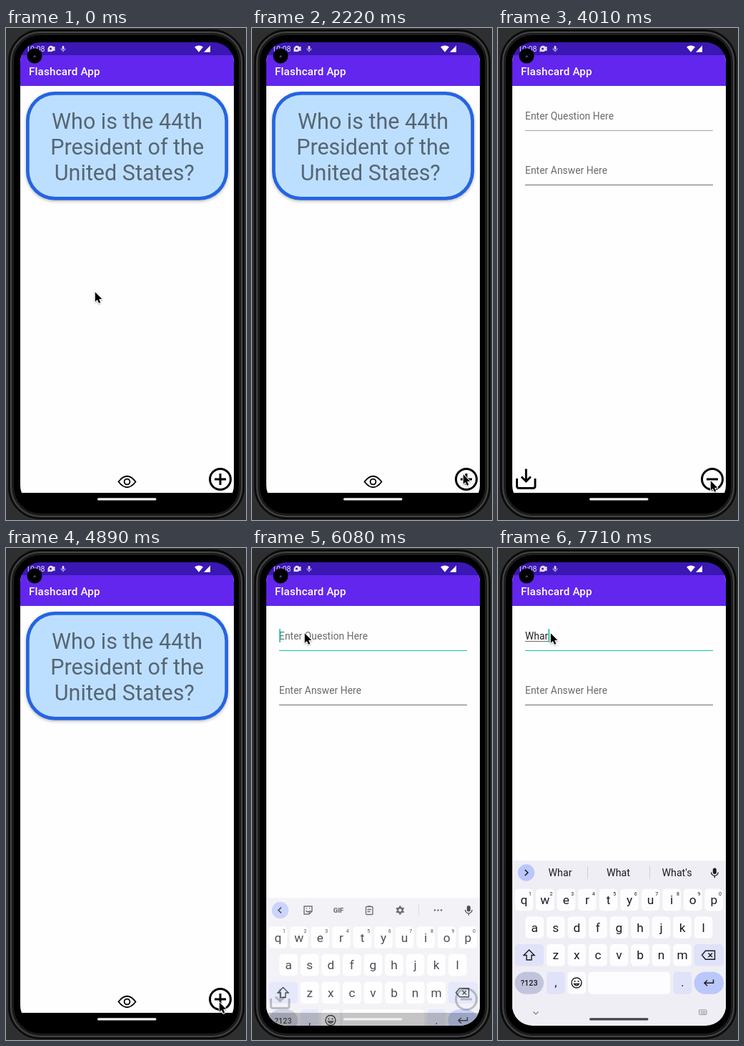
An HTML page with a canvas that plays this animation: 336 by 688 pixels, repeating every 8000 ms.

```html
<!DOCTYPE html>
<html lang="en">
<head>
<meta charset="utf-8">
<title>Flashcard App</title>
<style>
html, body { margin: 0; width: 100%; height: 100%; overflow: hidden; background: #2e2f31; }
canvas { display: block; width: 336px; height: 688px; }
</style>
</head>
<body>
<canvas id="stage"></canvas>
<script>
const W = 336, H = 688, LOOP = 8000, STEP = LOOP / 54;
const canvas = document.getElementById('stage');
const ctx = canvas.getContext('2d');
const dpr = window.devicePixelRatio || 1;
canvas.width = W * dpr;
canvas.height = H * dpr;

const INK = '#1b1b20', KEY = '#fdfdff', TINT = '#dfe2f9', ACCENT = '#bac7fb', TEAL = '#12bfa9';
const clamp = v => Math.max(0, Math.min(1, v));

// Helpers
function box(x, y, w, h, r, fill, stroke, lw = 1) {
  ctx.beginPath();
  ctx.roundRect(x, y, w, h, r);
  if (fill) { ctx.fillStyle = fill; ctx.fill(); }
  if (stroke) { ctx.strokeStyle = stroke; ctx.lineWidth = lw; ctx.stroke(); }
}
const disc = (x, y, r, fill, stroke, lw) => box(x - r, y - r, 2 * r, 2 * r, r, fill, stroke, lw);
function line(d, color, lw) {
  ctx.strokeStyle = color;
  ctx.lineWidth = lw;
  ctx.stroke(new Path2D(d));
}
function shape(d, color) {
  ctx.fillStyle = color;
  ctx.fill(new Path2D(d));
}
function text(s, x, y, size, color, { align = 'left', weight = 400, spacing = 0 } = {}) {
  ctx.font = `${weight} ${size}px Roboto, sans-serif`;
  ctx.letterSpacing = spacing + 'px';
  ctx.textAlign = align;
  ctx.fillStyle = color;
  ctx.fillText(s, x, y);
}
const label = (s, x, y, size, weight = 400) => text(s, x, y, size, INK, { align: 'center', weight });
function at(x, y, draw) {
  ctx.save();
  ctx.translate(x, y);
  draw();
  ctx.restore();
}

// Pointer waypoints: step, x, y
const POINTER = [
  [0, 124, 368], [1, 107, 343], [2, 88, 302], [3, 106, 269], [4, 139, 286], [5, 161, 326], [6, 167, 351],
  [10, 167, 351], [11, 182, 383], [13, 256, 540], [14, 287, 606], [15, 295, 623],
  [23, 295, 623], [27, 297, 632], [31, 297, 632], [33, 298, 634],
  [36, 298, 634], [37, 256, 530], [38, 160, 300], [39, 92, 150], [40, 73, 118], [54, 73, 118]
];
function pointerAt(step) {
  const n = Math.max(1, POINTER.findIndex(p => p[0] >= step));
  const [a, ax, ay] = POINTER[n - 1], [b, bx, by] = POINTER[n];
  const k = (step - a) / (b - a);
  return [ax + (bx - ax) * k, ay + (by - ay) * k];
}

const TYPED_AT = [46, 48, 49, 51];
const typedAt = step => 'Whar'.slice(0, TYPED_AT.filter(s => s <= step).length);
const SUGGESTIONS = { W: ['What', 'We'], Wh: ['What', 'When'], Wha: ['What', "What's"], Whar: ['What', "What's"] };

// Phone
function phone() {
  ctx.fillStyle = '#2e2f31';
  ctx.fillRect(0, 0, W, H);
  box(4, 3, 329, 683, 44, '#151515', '#0a0a0a', 2);
  box(7, 6, 323, 677, 41, null, '#444445', 2.2);
  box(10, 9, 317, 671, 38, '#000', '#1c1c1d', 2);
}
function statusBar() {
  const c = '#e4dcfa', bar = '#3b17b4';
  ctx.fillStyle = bar;
  ctx.fillRect(20, 20, 299, 18);
  text('10:08', 28, 33, 10.6, c);
  disc(63, 29, 4.3, c);
  shape('M58.5 33.5v-5l4 4zM66.5 26h2v6h-2z', c);
  disc(62.5, 29, 1.5, bar);
  box(78.7, 25, 2.6, 5, 1.3, c);
  line('M77 28.500a3 3 0 0 0 6 0M80 31.500v2', c, .9);
  shape('M270 33.8l-6-7.2q6-4.4 12 0zM277 33.8h9v-9.2z', '#fff');
}
function camera() {
  disc(40, 39, 10.5, '#000');
  disc(40, 40, 1.8, '#343338');
  disc(40.5, 39.5, .7, '#777');
}

// Pages
function pageBase() {
  ctx.fillStyle = '#fefefe';
  ctx.fillRect(-20, 38, 380, 612);
  ctx.fillStyle = '#6226ee';
  ctx.fillRect(-20, 38, 380, 43);
  text('Flashcard App', 32, 66, 15.2, '#fff', { weight: 500, spacing: .19 });
}
function roundButton(plus) {
  disc(300, 631, 14.5, null, '#000', 3);
  line('M292 631h16' + (plus ? 'M300 623v16' : ''), '#000', 3);
}
function saveButton() {
  line('M26.5 630v10.500q0 3 3 3h19.500q3 0 3-3v-10.500M39.300 616.500v17M32.800 627.500l6.500 6.500 6.500-6.500', '#000', 2.9);
}
function cardPage() {
  pageBase();
  ctx.save();
  ctx.shadowColor = 'rgba(0,0,0,.28)';
  ctx.shadowBlur = 4 * dpr;
  ctx.shadowOffsetY = 1.5 * dpr;
  box(28, 89, 283, 151.7, 40.3, '#2564e2');
  ctx.restore();
  box(32.7, 93.7, 273.6, 142.3, 35.7, '#bddfff');
  ['Who is the 44th', 'President of the', 'United States? '].forEach((s, i) =>
    text(s, 169.6, 141 + i * 36, 30.5, '#566674', { align: 'center' }));
  line('M157.500 634.500q12-15.500 24 0q-12 15.500-24 0z', '#000', 1.8);
  disc(169.5, 634.5, 3.9, null, '#000', 1.8);
}
function formPage(typed, focused, caret) {
  pageBase();
  const field = { spacing: .07 }, hint = '#696969';
  text(typed || 'Enter Question Here', 38, 128, 13.8, typed ? '#222' : hint, field);
  const end = typed ? 38 + ctx.measureText(typed).width : 38;
  if (typed) line(`M38 130.500H${end}`, '#444', .8);
  if (caret) box(end + .2, 113, 1.6, 19, 0, TEAL);
  text('Enter Answer Here', 38, 204, 13.8, hint, field);
  line('M38 143.500H301', focused ? TEAL : '#a4a4a4', 1);
  line('M38 219.500H301', '#6c6c6c', 1);
  saveButton();
}

// The incoming page fades in while both pages slide sideways.
function pages(t, ...formState) {
  const card = () => { cardPage(); roundButton(true); };
  const form = () => { formPage(...formState); roundButton(false); };
  const slide = e => 30 * Math.exp(-e / 75);
  const open = t >= 5085 ? t - 5085 : t - 2863, close = t - 4178;
  if (open < 0) return card();
  if (close >= 0 && t < 5085) {
    at(-slide(close), 0, card);
    const alpha = clamp((118 - close) / 83);
    if (alpha) {
      ctx.globalAlpha = alpha;
      at(30 - slide(close), 0, form);
      ctx.globalAlpha = 1;
    }
    return;
  }
  const alpha = clamp((open - 50) / 83);
  if (alpha < 1) at(slide(open) - 30, 0, card);
  ctx.globalAlpha = alpha;
  at(open < 350 ? slide(open) : 0, 0, form);
  ctx.globalAlpha = 1;
}
function navBar() {
  ctx.fillStyle = '#000';
  ctx.fillRect(20, 650, 299, 18);
}

// Keyboard
function toolRow(word) {
  const y = 454;
  disc(39.5, y, 11.7, ACCENT);
  line(word ? 'M37.800 450l4 4-4 4' : 'M41 450l-4 4 4 4', INK, 1.6);
  box(300.8, 447.5, 5, 8.5, 2.5, INK);
  line('M298.500 453.500a4.800 4.800 0 0 0 9.600 0M303.300 458.300v3', INK, 1.3);
  if (word) {
    [word, ...SUGGESTIONS[word]].forEach((s, i) => label(s, [87, 168.5, 250.5][i], 459.3, 14.2));
    line('M125.500 445v18M212.500 445v18', '#cfced6', 1);
    return;
  }
  const c = '#45464f';
  line('M73 448.500h11v7l-4 4h-7zM80 459.500v-4h4M75.500 454.500q2 3 4 1M76 451.500h1M80 451.500h1', c, 1.4);
  text('GIF', 121, 457.5, 9.5, c, { align: 'center', weight: 900 });
  box(159.5, 449, 9.5, 11, 1, null, c, 1.4);
  line('M162 448.500h4.500M161.500 453h5.500M161.500 456h4', c, 1.5);
  disc(207.3, y, 3.4, null, c, 2.6);
  for (let i = 0; i < 6; i++) {
    const a = i * Math.PI / 3;
    disc(207.3 + 5 * Math.sin(a), y - 5 * Math.cos(a), 1.3, c);
  }
  line('M233.500 445v18', '#d6d5dc', 1);
  [256, 260.5, 265].forEach(x => disc(x, y, 1.3, c));
}
function keyRow(letters, x, y, digits) {
  [...letters].forEach((ch, i) => {
    const cx = x + i * 29.55;
    box(cx - 12.8, y - 15.3, 25.6, 30.6, 5, KEY);
    label(ch, cx, y + 6, 17.3);
    if (digits) label((i + 1) % 10, cx + 8.7, y - 6.5, 7);
  });
}
function keyboard(word) {
  box(20, 437, 299, 300, 0, '#efeef5');
  toolRow(word);
  keyRow('qwertyuiop', 36.3, 492, true);
  keyRow('asdfghjkl', 51.2, 530.5);
  keyRow('zxcvbnm', 80.8, 569.3);
  box(23.5, 554, 40.5, 30.6, 5, TINT);
  line('M43.500 562l7.500 7.500h-4v6.500h-7v-6.500h-4z', INK, 1.4);
  box(274.5, 554, 41.5, 30.6, 5, TINT);
  line('M285.500 569.300l5-6h13v12h-13zM294.500 566.500l5.500 5.500M300 566.500l-5.500 5.500', INK, 1.4);
  box(23.5, 592.7, 40.5, 31, 15.5, '#c1c4dc');
  label('?123', 43.7, 612.3, 10.8, 500);
  box(68, 592.7, 25.6, 31, 5, TINT);
  label(',', 80.8, 613, 16);
  box(97.4, 592.7, 25.6, 31, 5, KEY);
  disc(110, 608, 7, null, INK, 1.4);
  disc(107.5, 606, 1.1, INK);
  disc(112.5, 606, 1.1, INK);
  line('M106.500 609.500q3.500 4.500 7 0z', INK, 1.3);
  box(126.5, 592.7, 114.5, 31, 5, KEY);
  box(245.5, 592.7, 25.6, 31, 5, TINT);
  label('.', 258.3, 613, 16);
  box(274.5, 592.7, 41.5, 31, 15.5, ACCENT);
  line('M301.500 603.500v4.800h-12M293 604.500l-4 3.800 4 3.800', INK, 1.5);
  line('M49.500 648.500l3.500 3.500 3.500-3.500', '#777983', 1.2);
  box(281.5, 646, 10.500, 6.500, 1, null, '#8b8c95', 1);
  line('M283.500 648.500h7M283.500 650.500h7', '#8b8c95', .9);
}
// Slides up; what lies behind it shines through until it has settled.
function risingKeyboard(word, hidden) {
  const top = 231 * hidden;
  at(0, top, () => keyboard(word));
  ctx.globalAlpha = hidden;
  box(20, 437 + top, 299, 231, 0, '#fefefe');
  saveButton();
  roundButton(false);
  navBar();
  ctx.globalAlpha = 1;
}

function arrow(x, y) {
  at(x, y + .5, () => {
    const d = 'M.8 .8V14.300L3.900 11.400 6 16.300 8.300 15.300 6.200 10.500H10.400Z';
    ctx.lineJoin = 'round';
    ctx.shadowColor = 'rgba(0,0,0,.3)';
    ctx.shadowBlur = 2 * dpr;
    ctx.shadowOffsetY = dpr;
    line(d, '#fff', 1.9);
    ctx.shadowColor = 'transparent';
    shape(d, '#000');
  });
}

function draw(now) {
  const step = Math.floor((now % LOOP) / STEP + .06) % 54;
  const t = step * STEP;
  const focused = step >= 40;
  const caret = focused && (step < 43 || step >= 46);
  const hidden = (1 - clamp((t - 5963) / 285)) ** 3;

  ctx.setTransform(dpr, 0, 0, dpr, 0, 0);
  phone();
  ctx.save();
  ctx.beginPath();
  ctx.roundRect(20, 20, 299, 648, 28);
  ctx.clip();
  pages(t, typedAt(step), focused, caret);
  statusBar();
  navBar();
  if (hidden < 1) risingKeyboard(typedAt(step - 1), hidden);
  ctx.restore();
  camera();
  const shade = 240 - 172 * clamp((t - 6225) / 290);
  box(128, 657.2, 82.5, 3.4, 1.7, `rgb(${shade},${shade},${shade})`);
  arrow(...pointerAt(step));
  requestAnimationFrame(draw);
}
requestAnimationFrame(draw);
</script>
</body>
</html>
```
